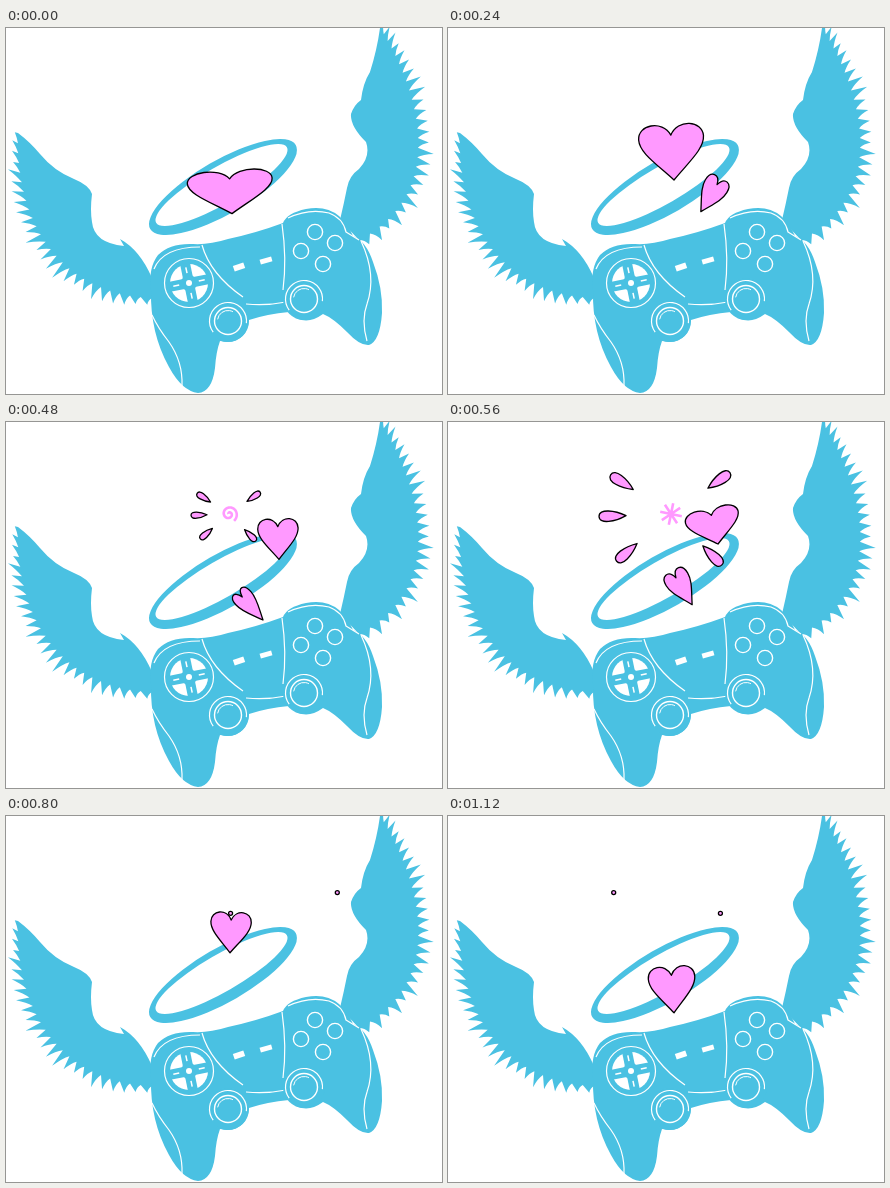
Write an HTML page with a canvas that moves like this. It is 436x366 px and loops after 1200 ms.

```html
<!DOCTYPE html>
<html lang="en">
<head>
<meta charset="utf-8">
<title>Winged controller</title>
<style>
html, body { margin: 0; width: 100%; height: 100%; overflow: hidden; background: #fff; }
canvas { display: block; }
</style>
</head>
<body>
<canvas id="stage" width="436" height="366"></canvas>
<script>
const ctx = document.getElementById('stage').getContext('2d');
const BLUE = '#4ac1e2', PINK = '#ff99ff', WHITE = '#fff', INK = '#000';
const STEP = 80, STEPS = 15;
const rad = deg => deg * Math.PI / 180;

function fill(path, color, rule) {
  ctx.fillStyle = color;
  ctx.fill(path, rule || 'nonzero');
}

function stroke(path, color, width) {
  ctx.strokeStyle = color;
  ctx.lineWidth = width;
  ctx.stroke(path);
}

function arc(x, y, r, from = 0, to = 7) {
  const p = new Path2D();
  p.arc(x, y, r, from, to);
  return p;
}

function bezier(p, t) {
  const u = 1 - t;
  return [0, 1].map(i =>
    u * u * u * p[0][i] + 3 * u * u * t * p[1][i] + 3 * u * t * t * p[2][i] + t * t * t * p[3][i]);
}

// A smooth leading edge, then feathers along a bezier, their angle turning from one end to the other.
function wing(edge, curve, fromDeg, toDeg, seed) {
  const count = 25, p = new Path2D(edge);
  const random = () => (seed = seed * 16807 % 2147483647) / 2147483647;
  for (let i = 0; i < count; i++) {
    const t = (i + 0.4) / count;
    const [x, y] = bezier(curve, t), [ex, ey] = bezier(curve, (i + 1) / count);
    const a = rad(fromDeg + (toDeg - fromDeg) * t);
    const length = (11 + 10 * random()) * (0.5 + 0.5 * Math.sin(Math.PI * t));
    const tx = x + length * Math.cos(a), ty = y + length * Math.sin(a);
    p.lineTo(tx, ty);
    p.quadraticCurveTo((x + tx + ex) / 3, (y + ty + ey) / 3, ex, ey);
  }
  p.closePath();
  return p;
}

const leftWing = wing(
  'M146 270 L146 250 Q134 222 114 211 L118 218 Q88 215 86 194 Q84 182 86 166 Q83 157 68 151 Q48 143 34 126 Q24 114 12 105',
  [[12, 105], [10, 190], [50, 265], [146, 270]], 240, 70, 11);

const rightWing = wing(
  'M353 212 L334 192 Q338 175 341 160 Q343 148 353 141 Q365 128 360 114 Q344 98 345 86 Q348 77 355 72 Q357 55 364 44 Q371 22 374 0',
  [[374, 0], [405, 50], [450, 160], [353, 212]], -75, 70, 29);

const halo = new Path2D();
halo.ellipse(217, 159, 84, 26.8, -Math.PI / 6, 0, 7);
halo.closePath();
halo.ellipse(215.5, 157, 75.5, 18.5, -Math.PI / 6, 0, 7);

const body = new Path2D(
  'M145 262 Q142 240 152 227 Q164 215 187 216 Q203 217 222 211 Q250 205 277 195 ' +
  'Q281 185 300 181 Q320 177 333 188 Q342 196 347 208 Q360 213 367 234 ' +
  'Q377 260 376 285 Q374 313 363 317 Q354 318 341 304 Q327 290 317 286 ' +
  'Q298 300 283 284 Q261 286 243 292 Q241 313 221 314 L214 313 ' +
  'Q210 324 209 340 Q206 364 192 365 Q176 363 163 339 Q144 305 145 262 Z');

const seams = new Path2D(
  'M146 287 Q152 300 163 314 Q177 334 176 358 ' +
  'M355 213 Q371 247 361 276 Q355 292 361 313 ' +
  'M148 241 Q157 219 194 219 M196 217 Q204 246 237 269 ' +
  'M276 196 Q281 231 277 262 M240 276 Q260 278 280 274 ' +
  'M282 190 Q303 180 323 185 Q337 190 340 204 L353 212');

const star = new Path2D();
for (let i = 0; i < 8; i++) {
  const a = i * Math.PI / 4 + 0.2;
  star.moveTo(0, 0);
  star.lineTo(11 * Math.cos(a), 11 * Math.sin(a));
}

const spiral = new Path2D();
for (let a = 0; a < 10; a += 0.2) {
  const r = 0.5 + a * 0.8;
  spiral.lineTo(r * Math.cos(a + 3.5), r * Math.sin(a + 3.5));
}

function bar(x, y, w, h, angle, color) {
  ctx.save();
  ctx.translate(x, y);
  ctx.rotate(angle);
  ctx.fillStyle = color;
  ctx.fillRect(-w / 2, -h / 2, w, h);
  ctx.restore();
}

function drawDirections(x, y) {
  stroke(arc(x, y, 24.5), WHITE, 1.2);
  fill(arc(x, y, 19), WHITE);
  fill(arc(x, y, 8), BLUE);
  for (let i = 0; i < 4; i++) {
    const a = i * Math.PI / 2 - 0.2, dx = Math.cos(a), dy = Math.sin(a);
    bar(x + 10 * dx, y + 10 * dy, 20, 10, a, BLUE);
    bar(x + 13 * dx, y + 13 * dy, 6, 1.5, a, WHITE);
  }
  fill(arc(x, y, 3), WHITE);
}

function drawStick(x, y) {
  fill(arc(x, y, 21), BLUE);
  stroke(arc(x, y, 18.5, 2.5, 6.4), WHITE, 1.2);
  stroke(arc(x, y, 13.5), WHITE, 1.4);
  stroke(arc(x, y, 10.5, 3.3, 5.2), WHITE, 1);
}

function drawPad() {
  for (const shape of [leftWing, rightWing, body]) fill(shape, BLUE);
  fill(halo, BLUE, 'evenodd');
  stroke(seams, WHITE, 1.2);
  drawDirections(183, 255);
  bar(233, 239, 11, 6, -0.32, WHITE);
  bar(260, 232.5, 12, 5, -0.28, WHITE);
  for (const [x, y] of [[309, 204], [329, 215], [295, 223], [317, 236]])
    stroke(arc(x, y, 7.6), WHITE, 1.4);
  drawStick(222, 293);
  drawStick(298, 271);
}

// Unit shapes: the heart's tip is at the origin, the petal points inwards.
const heart = new Path2D(
  'M0 0 C-.25 -.38 -.5 -.65 -.5 -.94 C-.5 -1.28 -.12 -1.36 0 -1 C.12 -1.36 .5 -1.28 .5 -.94 C.5 -.65 .25 -.38 0 0 Z');
const petal = new Path2D('M-.5 0 C-.1 -.23 .5 -.34 .5 0 C.5 .34 -.1 .23 -.5 0 Z');

function outlined(shape, x, y, deg, w, h) {
  const p = new Path2D();
  p.addPath(shape, new DOMMatrix().translate(x, y).rotate(deg).scale(w, h));
  fill(p, PINK);
  stroke(p, INK, 1.3);
}

// Each heart rises steadily and grows, with one short squash; side hearts swing out and straighten up.
const hearts = [
  { start: 13, life: 7, x: 226, y: 208, rise: 11.2, side: 0, width: 40, height: 36, squashAge: 2, squash: 0.7 },
  { start: 2, life: 5, x: 240, y: 199, rise: 15.4, side: 1, width: 20, height: 31, squashAge: 5, squash: 0.2 },
  { start: 6, life: 5, x: 257, y: 198, rise: 15.3, side: -1, width: 20, height: 31, squashAge: 5, squash: 0.2 }
];

function drawHeart(h, step) {
  const age = (step - h.start + STEPS) % STEPS;
  if (age > h.life) return;
  const pulse = Math.exp(-3 * (age - h.squashAge) ** 2);
  const x = h.x + h.side * 33 * Math.sin(age * 0.4);
  const tilt = h.side ? h.side * (42 - 11 * age) : -4;
  const w = (h.width + 5 * age) * (1 + h.squash * pulse);
  const tall = (h.height + (h.side ? 0.5 : 1.8) * age) * (1 - 0.12 * pulse);
  outlined(heart, x, h.y - h.rise * age, tilt, w, tall);
}

// Bursts last three steps: small petals, larger petals, then the last few dots.
const sparks = [-143, -15, 166, 38];
const bursts = [
  { start: 6, x: 223, y: 92, flip: 1, drift: 0, radius: 30, grow: 0.95, size: 16, swell: 11, dots: 5,
    angles: [-147, 178, 139, -35, 45] },
  { start: 8, x: 277, y: 105, flip: -1, drift: 1, radius: 28, grow: 0.58, size: 17, swell: 3, dots: 2, angles: sparks },
  { start: 12, x: 220, y: 105, flip: 1, drift: 1, radius: 28, grow: 0.58, size: 17, swell: 3, dots: 2, angles: sparks }
];

function drawBurst(b, step) {
  const phase = step - b.start;
  if (phase < 0 || phase > 2) return;
  const r = b.radius * (1 + b.grow * phase), ended = phase === 2;
  for (const deg of b.angles.slice(0, ended ? b.dots : b.angles.length)) {
    const x = b.x + b.flip * (r * Math.cos(rad(deg)) - 3 * b.drift * phase);
    const y = b.y + r * Math.sin(rad(deg)) + 4 * b.drift * phase;
    if (ended) {
      fill(arc(x, y, 2), PINK);
      stroke(arc(x, y, 2), INK, 1.3);
    } else {
      const size = b.size + b.swell * phase;
      outlined(petal, x, y, b.flip > 0 ? deg : 180 - deg, size, size * 0.9);
    }
  }
  if (ended) return;
  ctx.save();
  ctx.translate(b.x, b.y);
  stroke(phase ? star : spiral, PINK, 2.6);
  ctx.restore();
}

function frame() {
  const step = Math.floor(performance.now() / STEP) % STEPS;
  ctx.fillStyle = WHITE;
  ctx.fillRect(0, 0, 436, 366);
  drawPad();
  hearts.forEach(h => drawHeart(h, step));
  bursts.forEach(b => drawBurst(b, step));
  requestAnimationFrame(frame);
}

ctx.lineJoin = 'round';
frame();
</script>
</body>
</html>
```
